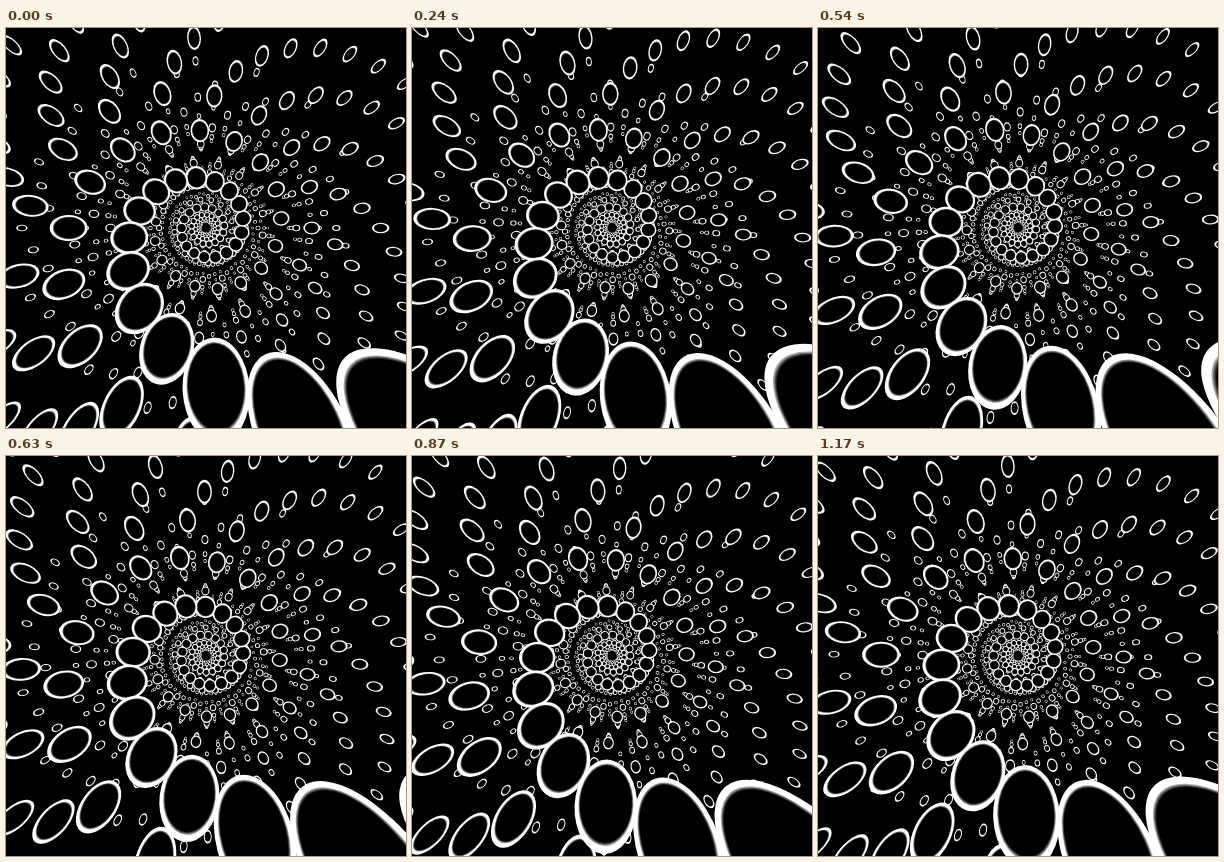
An HTML page with a canvas that plays this animation: 400 by 400 pixels, repeating every 1.2 s.

```html
<!DOCTYPE html>
<html>
<head>
<meta charset="utf-8">
<style>
html, body { margin: 0; height: 100%; overflow: hidden; background: #000; }
canvas { display: block; }
</style>
</head>
<body>
<canvas id="stage" width="400" height="400"></canvas>
<script>
const ctx = document.getElementById('stage').getContext('2d');
const LOOP = 1200, STEP = 30;
const FOCAL = 130, LAYERS = 110, ARMS = 10;
const RADIUS = 4.69, SPACING = 5.77;            // in sphere radii
const TWIST = 21.6 * Math.PI / 180, FAN = Math.PI / 5;
const SHADES = ['#fff', '#aaa', '#666', '#2a2a2a', '#000'];

// Perspective outline of a sphere of the given size at distance dist off the axis
function disc(dist, depth, angle, size, color) {
  const d = depth * depth - size * size;
  const center = FOCAL * dist * depth / d;
  const long = FOCAL * size * Math.sqrt(dist * dist + d) / d;
  if (center - long > 290) return;
  ctx.fillStyle = color;
  ctx.beginPath();
  ctx.ellipse(200 + center * Math.cos(angle), 200 + center * Math.sin(angle),
    long, FOCAL * size / Math.sqrt(d), angle, 0, 2 * Math.PI);
  ctx.fill();
}

// White rim fading to a black inside; far spheres get a relatively wider rim
function sphere(dist, depth, angle) {
  const rim = Math.min(.12 + .005 * depth, .45);
  SHADES.forEach((color, i) =>
    disc(dist, depth, angle, i ? 1 - rim * (.7 + .12 * i) : 1, color));
}

function draw(phase) {
  ctx.fillStyle = '#000';
  ctx.fillRect(0, 0, 400, 400);
  for (let layer = LAYERS; layer > 1; layer--) {
    const depth = layer - phase;
    if (depth < 1.3) continue;
    for (let arm = ARMS - 1; arm >= 0; arm--)
      sphere(RADIUS + SPACING * arm, depth, TWIST * depth - FAN * arm);
  }
}

function tick() {
  const time = performance.now() % LOOP;
  draw(Math.floor(time / STEP) * STEP / LOOP);
  requestAnimationFrame(tick);
}
tick();
</script>
</body>
</html>
```
